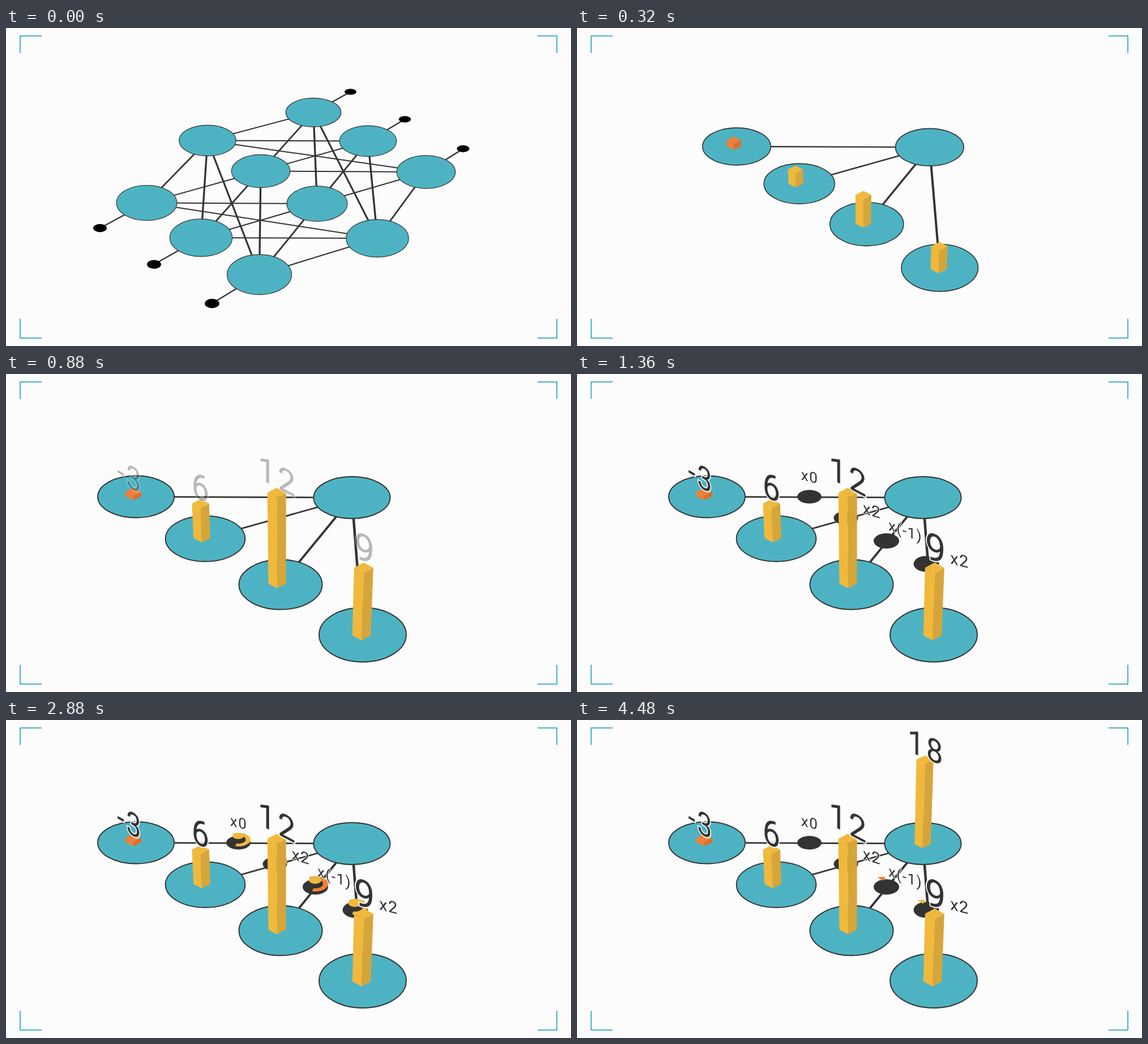
An HTML page that plays this animation: 998x561 px, repeating every 10 s.

```html
<!DOCTYPE html>
<html lang="en">
<head>
<meta charset="utf-8">
<title>Neuron weights</title>
<style>
  html, body { margin: 0; width: 100%; height: 100%; overflow: hidden; background: #fcfcfc; }
  svg { display: block; width: 100vw; height: 100vh; }
  text { font-family: Roboto, "Open Sans", sans-serif; fill: #333; text-anchor: middle;
         stroke: #fcfcfc; paint-order: stroke; stroke-linejoin: round; }
</style>
</head>
<body>
<svg viewBox="0 0 998 561">
  <path d="M63 14H25V44M939 14H973V44M63 547H25V513M939 547H973V513" fill="none" stroke="#4db3c3" stroke-width="2"/>
  <g id="scene"></g>
</svg>
<script>
const LOOP = 10000, STEP = 80;
const TEAL = '#4db3c3', DARK = '#333';
const YELLOW = ['#f0b93c', '#d6a53a'], ORANGE = ['#f08038', '#d8702b'];

// x, y before and after the camera move
const inputs = [[248.5, 308.5, 73.5, 367], [344.5, 370, 198.5, 453], [447.5, 435, 339.5, 552]];
const hidden = [[356, 198.5, 229.5, 216.5], [450, 252.5, 352, 290.5], [549.5, 310, 485, 371.5], [656, 371, 630, 460]];
const outputs = [[543, 149, 485, 150], [639.5, 199.5, 611, 218], [742, 254, 750, 291]];
const stubs = [[166, 353, -46, 432], [261.5, 417, 78.5, 525], [364, 486, 222, 628],
               [608.5, 112.5, 571, 100], [704.5, 161, 700, 165], [807.5, 213, 836.5, 238]];

// base offset from the node, height, colours
const bars = [
  { dx: -4.5, dy: 6, h: 7.5, tone: ORANGE },
  { dx: -6, dy: 6.5, h: 61, tone: YELLOW },
  { dx: -6, dy: 6.5, h: 160, tone: YELLOW },
  { dx: -2, dy: 10, h: 119, tone: YELLOW }
];
const sumBar = { dx: -0.5, dy: 8, h: 149, tone: YELLOW };

const weights = [
  { x: 410.5, y: 216.5, rx: 21.5, ry: 12, dock: [550, 218], tone: YELLOW[0], zero: true },
  { x: 475, y: 254, rx: 21.5, ry: 12.5, dock: [570, 229], tone: YELLOW[0] },
  { x: 546.5, y: 294.5, rx: 22.5, ry: 13.5, dock: [592, 241], tone: ORANGE[0] },
  { x: 617, y: 335, rx: 22.5, ry: 14, dock: [613, 252.5], tone: YELLOW[0] }
];

// text, x, y, size, x scale, slope
const values = [['-3', 219, 201, 57, .82, .46], ['6', 345, 222.5, 63, .88, .4],
                ['12', 480, 201.5, 59, .95, .5], ['9', 635, 331.5, 67, .97, .4]];
const total = ['18', 617, 68.5, 58, .9, .38];
const factors = [['x0', 411, 190, 26, 1, .25], ['x2', 521, 250.5, 28, 1, .3],
                 ['x(-1)', 580, 286, 26, 1, .36], ['x2', 676, 338.5, 29, 1, .25]];

const ramp = (t, a, b) => Math.min(1, Math.max(0, (t - a) / (b - a)));
const ease = (t, a, b) => { const u = ramp(t, a, b); return u * u * (3 - 2 * u); };
const mix = (a, b, u) => a + (b - a) * u;

function ellipse(x, y, rx, ry, fill, more = '') {
  return `<ellipse cx="${x}" cy="${y}" rx="${rx}" ry="${ry}" fill="${fill}" ${more}/>`;
}

function poly(points, fill) {
  return `<path d="M${points.map(q => q.join(' ')).join('L')}Z" fill="${fill}"/>`;
}

function label([str, x, y, size, sx, slope], halo, spacing, alpha) {
  return `<text transform="matrix(${sx} ${slope} 0 1 ${x} ${y})" font-size="${size}" ` +
    `letter-spacing="${spacing}" stroke-width="${halo}" opacity="${alpha}">${str}</text>`;
}

function pie(x, y, rx, ry, from, to, fill) {
  const at = deg => {
    const r = deg * Math.PI / 180;
    return `${x + rx * Math.cos(r)} ${y + ry * Math.sin(r)}`;
  };
  return `<path d="M${x} ${y}L${at(from)}A${rx} ${ry} 0 ${to - from > 180 ? 1 : 0} 1 ${at(to)}Z" fill="${fill}"/>`;
}

// Project a point with the size a node has there
function place([x0, y0, x1, y1], p) {
  const x = mix(x0, x1, p), y = mix(y0, y1, p);
  return { x, y, rx: 45 + 15 * p + (.029 + .01 * p) * y, ry: 20.8 + 7.4 * p + (.035 + .01 * p) * y };
}

// Lines lie flat on the floor, so level ones look thinner
function link(a, b, p, alpha) {
  const dx = b.x - a.x, dy = b.y - a.y;
  const w = (3.3 + 1.2 * p) * Math.hypot(.58 * dx, dy) / Math.hypot(dx, dy);
  return `<path d="M${a.x} ${a.y}L${b.x} ${b.y}" stroke="${DARK}" stroke-width="${w}" opacity="${alpha}"/>`;
}

function node(n, p, alpha) {
  const w = 1.2 + .7 * p;
  return ellipse(n.x, n.y, n.rx - w / 2, n.ry - w / 2, TEAL, `stroke="${DARK}" stroke-width="${w}" opacity="${alpha}"`);
}

function bar(n, { dx, dy, tone }, h) {
  const x = n.x + dx, y = n.y + dy, w = n.rx * .208, d = n.ry * .18;
  const k = 1 + h * .0004, tx = x + (x - 500) * .00025 * h, ty = y - h;
  const left = [tx - w * k, ty - d * k], right = [tx + w * k, ty - d * k], tip = [tx, ty];
  return poly([left, tip, [x, y], [x - w, y - d]], tone[0]) +
    poly([tip, right, [x + w, y - d], [x, y]], tone[1]) +
    poly([left, [tx, ty - 2 * d * k], right, tip], tone[0]);
}

function gauge(w, t) {
  const end = -120 + mix(0, 225, ramp(t, 2560, 2880)) + mix(0, 134, ramp(t, 2880, 3120));
  const start = -120 + mix(0, 359, ramp(t, 3120, 3680));
  const y = w.y - 5.5;
  let s = ellipse(w.x, w.y, w.rx, w.ry, DARK);
  if (t > 2560 && end - start > 1) {
    s += pie(w.x, y, w.rx, w.ry, start, end, w.tone) +
      ellipse(w.x, y, w.rx * .6, w.ry * .6, DARK);
  }
  if (t >= 3120 && !w.zero) {
    s += poly([[-16, -17], [-3, -18], [-2, -14], [-6, -11]].map(q => [w.x + q[0], w.y + q[1]]), w.tone);
  }
  return s;
}

function token(n, w, t) {
  const a = ease(t, 1840, 2720), b = ease(t, 3040, 3760), c = ease(t, 3840, 4160);
  let x = mix(n.x - 4, w.x - .5, a), y = mix(n.y, w.y, a) - 12;
  x = mix(mix(x, w.dock[0], b), 610, c);
  y = mix(mix(y, w.dock[1], b), 219, c);
  const r = 6 + .018 * y;
  return ellipse(x, y, r, r * .58, YELLOW[0]);
}

function draw(t) {
  const p = ease(t, 60, 527), fade = 1 - ramp(t, 60, 260);
  const at = list => list.map(q => place(q, p));
  const ins = at(inputs), mids = at(hidden), outs = at(outputs), ends = at(stubs);
  const sum = outs[1];
  let s = '';

  if (fade > 0) {
    ends.forEach((e, i) => {
      s += link([...ins, ...outs][i], e, p, fade) +
        ellipse(e.x, e.y, e.rx * .217, e.ry * .217, '#000', `opacity="${fade}"`);
    });
    for (const m of mids)
      for (const n of [...ins, outs[0], outs[2]]) s += link(m, n, p, fade);
  }
  for (const m of mids) s += link(m, sum, p, 1);
  if (fade > 0) for (const n of [...ins, outs[0], outs[2]]) s += node(n, p, fade);
  for (const n of [...mids, sum]) s += node(n, p, 1);

  const shown = ramp(t, 1040, 1360);
  if (shown > 0) {
    s += `<g opacity="${shown}">${weights.map(w => gauge(w, t)).join('')}</g>`;
    if (t >= 1840 && t < 4160) weights.forEach((w, i) => s += token(mids[i], w, t));
    for (const f of factors) s += label(f, 2, 1.5, shown);
  }

  const rise = ease(t, 240, 480), extra = 36 * (1 - ease(t, 480, 800));
  if (rise > 0) bars.forEach((b, i) => s += bar(mids[i], b, (b.h + extra) * rise));
  const grow = ease(t, 3840, 4400);
  if (grow > 0) s += bar(sum, sumBar, sumBar.h * grow);

  const named = ramp(t, 800, 1040), summed = ramp(t, 4160, 4480);
  if (named > 0) for (const v of values) s += label(v, 4, 4, named);
  if (summed > 0) s += label(total, 4, 4, summed);
  scene.innerHTML = s;
}

const scene = document.getElementById('scene');
const born = performance.now();
let last = -1;
function tick() {
  const t = Math.floor((performance.now() - born) % LOOP / STEP) * STEP;
  if (t !== last) draw(last = t);
  requestAnimationFrame(tick);
}
tick();
</script>
</body>
</html>
```
